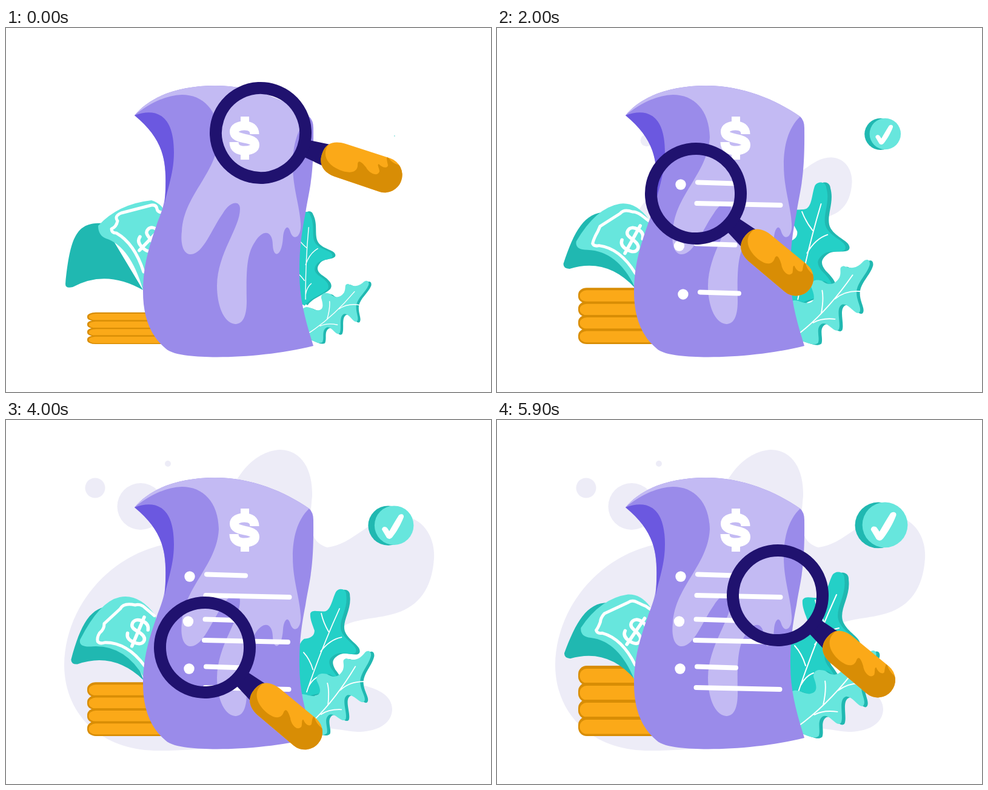
An HTML page that plays this animation: 800x600 px, repeating every 6000 ms.

```html
<!DOCTYPE html>
<html lang="en">
<head>
<meta charset="utf-8">
<title>Invoice check</title>
<style>
  html, body { margin: 0; width: 100%; height: 100%; overflow: hidden; background: #fff; }
  svg { display: block; width: 100%; height: 100%; }
  .grey { fill: #edecf7; }
  .mint { fill: #67e6dd; }
  .teal { fill: #24d0c7; }
  .deep { fill: #20b8b1; }
  .gold { fill: #fba918; }
  .ochre { fill: #d88d05; }
  .navy { fill: #20126f; }
  .white { fill: #fff; }
  .line { fill: none; stroke: #fff; stroke-linecap: round; stroke-linejoin: round; }
</style>
</head>
<body>
<svg viewBox="0 0 800 600" aria-hidden="true">
  <defs>
    <path id="grip" d="M107 0C107 -20 120 -27 138 -28L216 -29A29 29 0 0 1 216 29L138 29C118 28 107 18 107 0Z"/>
    <clipPath id="gripClip"><use href="#grip"/></clipPath>
    <path id="backShape" d="M553 256C558 247 574 249 573 262C577 290 556 312 564 332C572 350 594 358 592 370C589 382 566 368 552 376C538 384 538 392 545 404C556 418 566 434 554 443C535 452 510 448 490 462L470 440C475 390 478 355 492 346C505 345 512 340 512 330C508 318 503 308 504 297C508 288 522 295 533 293C544 289 546 270 553 256Z"/>
    <path id="frontShape" d="M603 369C608 363 616 364 615 374C611 392 595 405 595 424C596 440 606 450 603 458C598 468 584 445 572 447C558 453 572 480 568 492C561 501 548 478 537 484C526 492 536 508 533 518C524 527 505 514 480 512L474 456C484 437 496 450 510 449C526 446 520 432 514 420C512 406 525 406 533 408C545 416 556 414 563 400C567 388 559 382 569 379C582 383 592 383 603 369Z"/>
  </defs>

  <g id="cloud" class="grey">
    <path d="M452 49C490 50 506 85 505 125C502 160 495 200 530 210C575 205 600 158 650 158C690 160 708 195 706 228C702 290 670 315 625 323C590 330 545 330 538 365C530 410 545 430 570 434C615 440 637 455 637 477C636 505 605 514 580 514C550 512 530 504 500 510C430 535 310 546 245 545C150 542 96 480 96 403C98 300 180 215 275 203C340 180 360 125 390 85C408 62 430 50 452 49Z"/>
    <circle cx="222" cy="142.500" r="38.500"/>
    <circle cx="147" cy="112" r="16.500"/>
    <circle cx="267" cy="72" r="5"/>
  </g>

  <g id="coins"></g>

  <path id="noteBack" class="deep"/>
  <path id="noteFront" class="mint"/>
  <path id="noteEdge" class="line" stroke-width="5"/>
  <path id="noteSign" class="line" stroke-width="5.500" d="M14 -9C12 -17 6 -19 0 -19C-9 -19 -14 -15 -14 -9C-14 -2 -8 -1 0 0C9 1 15 4 15 10C15 16 9 19 0 19C-8 19 -14 16 -15 9M0 -26V26"/>

  <g id="badge">
    <ellipse class="deep" cx="629" cy="173.500" rx="38" ry="37.500"/>
    <circle class="mint" cx="640" cy="173" r="37"/>
    <path class="white" d="M617 181C617 175 624 174 627 178L631 184C637 174 643 163 649 154C653 150 660 152 658 158C653 171 645 185 637 195C633 200 629 199 626 196Z"/>
  </g>

  <g id="backLeaf">
    <use href="#backShape" class="deep" x="7" y="1"/>
    <use href="#backShape" class="teal"/>
    <path class="line" stroke-width="2" d="M560 288Q525 365 497 448M525 297Q529 315 539 332M564 343Q542 347 524 370M491 372Q503 385 509 405M522 417Q509 422 501 437"/>
  </g>
  <g id="frontLeaf">
    <use href="#frontShape" class="deep" x="6" y="1"/>
    <use href="#frontShape" class="mint"/>
    <path class="line" stroke-width="2" d="M498 504Q545 462 586 394M534 425Q538 440 535 466M604 422Q576 421 558 438M560 474Q537 473 522 483"/>
  </g>

  <path fill="#9a8bea" d="M212 144C240 110 290 95 345 95C405 95 460 118 500 146Q507 152 507 165C508 250 500 265 494 305C486 345 484 370 484 405C484 450 496 488 507 524C440 541 350 546 300 540C285 538 270 535 263 528C235 505 226 470 226 435C226 385 240 350 250 320C258 300 263 285 263 265C265 210 255 180 212 144Z"/>
  <path fill="#c3baf3" d="M212 144C240 110 290 95 345 95C405 95 460 118 500 146C480 165 473 195 473 225C473 265 484 290 486 322C488 345 474 352 469 336C465 322 458 330 457 345C455 378 441 380 440 358C440 335 425 330 411 352C397 372 396 400 397 450C397 480 388 488 378 488C358 486 348 455 348 425C349 370 386 330 386 298C386 284 370 285 358 305C340 330 325 373 305 373C290 373 288 350 290 335C293 275 348 240 351 180C350 135 325 110 290 110C262 111 235 125 212 144Z"/>
  <path fill="#6b58e0" d="M212 144C245 132 277 140 277 205C277 240 266 265 262 288C265 230 268 190 212 144Z"/>

  <path class="white" d="M387 146H401V160H387ZM387 203H401V217H387Z"/>
  <path class="line" style="stroke-linecap:butt" stroke-width="15" d="M410 175C410 165 403 161 393 161C383 161 376.500 165 376.500 171C376.500 178 384 180 393 182C403 184 410.500 186 410.500 193C410.500 199 403 202 393 202C383 202 376 198 376 188"/>

  <g id="rows"></g>

  <g id="lens">
    <path class="navy" d="M76 -14L118 -19V19L76 14Z"/>
    <circle r="74" fill="none" stroke="#20126f" stroke-width="20"/>
    <use href="#grip" class="gold"/>
    <path class="ochre" clip-path="url(#gripClip)" d="M100 -22L112 -18C107 0 118 14 143 16C158 17 174 12 168 -3C166 -12 177 -6 183 -2C190 5 206 8 206 -3C204 -8 198 -12 201 -14C208 -10 217 -11 216 -17C213 -22 210 -26 210 -31C220 -22 230 -22 250 -24V40H100Z"/>
  </g>
</svg>
<script>
const LOOP = 6000, STEP = 100;
const $ = id => document.getElementById(id);
const move = (id, value) => $(id).setAttribute('transform', value);
const draw = (id, d) => $(id).setAttribute('d', d);

// 0 before a, 1 after b, linear between
const ramp = (t, a, b) => Math.max(0, Math.min(1, (t - a) / (b - a)));

// Rises from start to top, falls to low, rises again to end
const swing = (t, start, top, low, end, peak = 3100, dip = 4600) =>
  start + (top - start) * ramp(t, 0, peak) + (low - top) * ramp(t, peak, dip) + (end - low) * ramp(t, dip, 5900);

// Blends two paths that use the same commands
function blend([a, b], k) {
  const ends = b.match(/[\d.]+/g);
  let i = 0;
  return a.replace(/[\d.]+/g, v => +v + (ends[i++] - v) * k);
}

const about = (x, y, turn, sx, sy = sx) =>
  `translate(${x} ${y}) rotate(${turn}) scale(${sx} ${sy}) translate(${-x} ${-y})`;

const noteBack = [
  'M98 422C106 340 118 320 160 322L226 432Q165 397 110 427Q98 430 98 422Z',
  'M116 370C140 330 160 292 195 293L228 426Q190 367 125 380Q116 378 116 370Z'];
const noteFront = [
  'M152 326Q185 290 240 284Q252 288 258 296L262 400L226 432Q205 360 165 347Q152 342 152 326Z',
  'M118 367Q150 300 180 293Q215 285 245 326L262 400L228 424Q195 372 140 377Q114 380 118 367Z'];
const noteEdge = [
  'M264 306L258 304Q250 304 249 298Q248 291 240 292L190 305Q178 310 184 318Q182 328 174 331Q174 338 182 338Q212 355 227 402',
  'M242 325L226 311Q218 302 208 306Q186 302 181 314L158 340Q160 350 150 356Q145 363 148 370Q152 374 160 371Q198 368 229 406'];

// Each row slides up from behind its floor until it rests
const rows = [
  { x: 303, y: 258, floor: 308, speed: .036, rest: 1700, lean: 0 },
  { x: 300.5, y: 332, floor: 379, speed: .0222, rest: 3220, lean: 0 },
  { x: 302, y: 410, floor: 451.5, speed: .015, rest: 3930, lean: .17 }];

$('rows').innerHTML = rows.map(({ x, y, floor }, i) => `
  <clipPath id="clip${i}"><rect x="280" y="${floor - 90}" width="200" height="90"/></clipPath>
  <g clip-path="url(#clip${i})"><g id="row${i}">
    <circle class="white" cx="${x}" cy="${y}" r="8.7"/>
    <path class="line" stroke-width="8" d="M${x + 28} ${y - 3.5}l64 2M${x + 26.5} ${y + 31}l138 3"/>
  </g></g>`).join('');

for (let y = 405; y < 500; y += 28) {
  $('coins').innerHTML +=
    `<rect class="ochre" x="134" y="${y}" width="136" height="32" rx="14"/>` +
    `<rect class="gold" x="136.500" y="${y + 5}" width="136" height="23.500" rx="11.500"/>`;
}

function render(t) {
  const x = 420 - 92 * ramp(t, 0, 1500) + 135 * ramp(t, 4700, 5900);
  const y = 173 + 100 * ramp(t, 0, 2000) + 65 * ramp(t, 2000, 3400) + 80 * ramp(t, 3400, 4700) - 129 * ramp(t, 4700, 5900);
  move('lens', `translate(${x} ${y}) rotate(${18.7 + 21.5 * ramp(t, 0, 1500)})`);

  move('cloud', about(400, 298, 0, ramp(t, 0, 3300)));
  move('badge', about(641, 178, 0, swing(t, .015, 1.07, .74, 1.01)));
  move('coins', about(0, 521, 0, 1, swing(t, .45, .922, .746, 1, 2700, 4150)));

  const grow = ramp(t, 0, 3400);
  move('backLeaf', about(490, 450, 19 * (grow - 1), swing(t, .69, 1.08, .71, 1)));
  move('frontLeaf', about(500, 503, 9.3 * (1 - grow) + 6 * ramp(t, 4600, 5900), swing(t, .73, 1.04, .785, .98)));

  const k = ramp(t, 0, 3200) - .6 * ramp(t, 3500, 5900);
  draw('noteBack', blend(noteBack, swing(t, 0, 1.02, .24, .72, 3200, 4450)));
  draw('noteFront', blend(noteFront, k));
  draw('noteEdge', blend(noteEdge, k));
  move('noteSign', `translate(${238 - 23 * k} ${348 + k}) rotate(${44 - 24 * k})`);

  rows.forEach(({ speed, rest, lean }, i) => {
    const drop = speed * Math.max(0, rest - t);
    move('row' + i, `translate(${lean * drop} ${drop})`);
  });
}

const start = performance.now();
function tick() {
  const t = (performance.now() - start) % LOOP;
  render(Math.floor(t / STEP) * STEP);
  requestAnimationFrame(tick);
}
tick();
</script>
</body>
</html>
```
